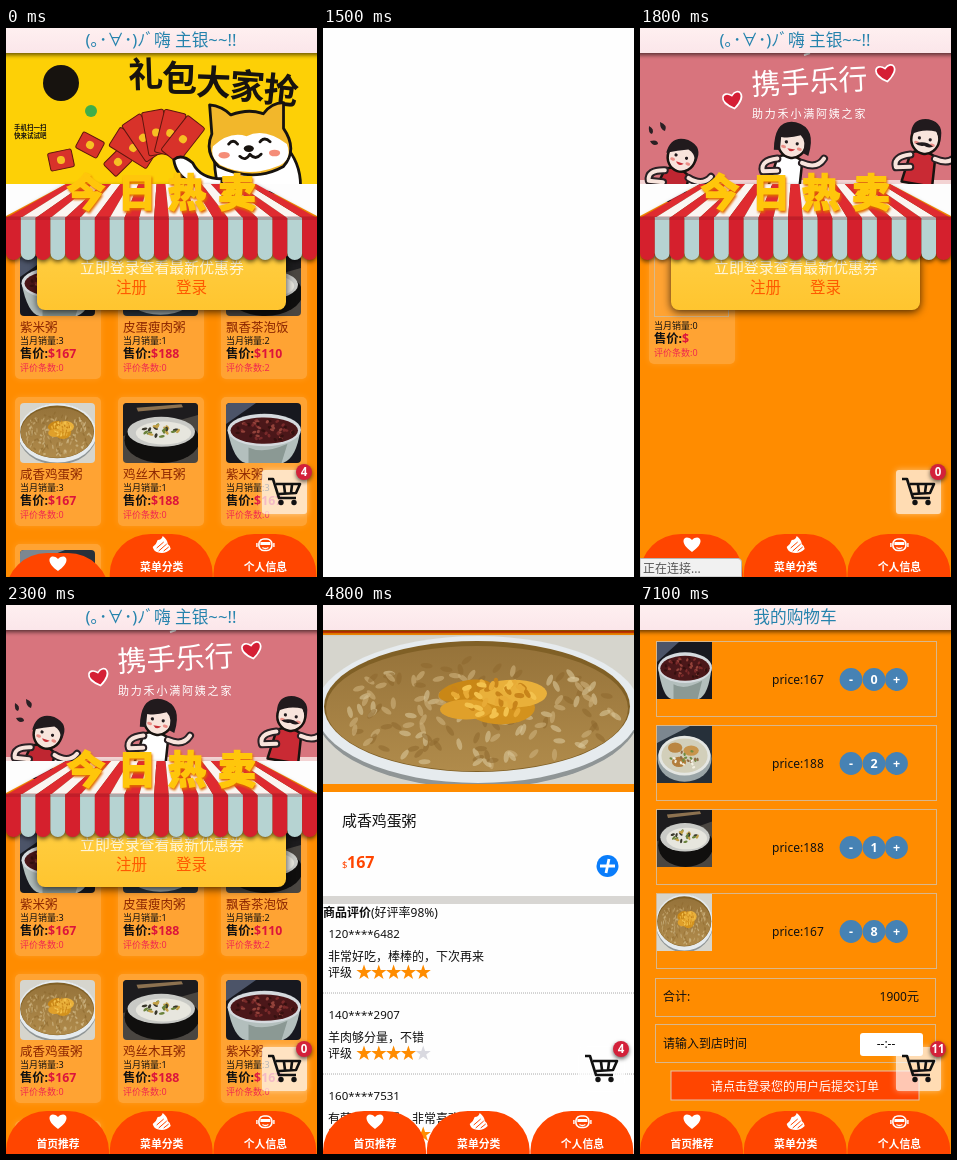
An HTML page that plays this animation: 311 px wide and 549 px high, repeating every 8 s.

```html
<!DOCTYPE html>
<html lang="zh-CN">
<head>
<meta charset="utf-8">
<style>
html, body { margin: 0; width: 311px; height: 549px; overflow: hidden; background: #fefefe; }
svg { display: block; font-family: "Noto Sans", "Noto Sans CJK SC", "Noto Sans CJK", sans-serif; }
.mid { text-anchor: middle; }
.b { font-weight: 700; }
.shade { filter: drop-shadow(0 2px 2px #0009); }
.glow { filter: drop-shadow(0 0 3px #fffa); }
.ink { stroke: #17130f; stroke-width: 2.5; stroke-linejoin: round; stroke-linecap: round; }
</style>
</head>
<body>
<svg id="stage" width="311" height="549" viewBox="0 0 311 549"></svg>
<script>
const rect = (x, y, w, h, fill, more = '') => `<rect x="${x}" y="${y}" width="${w}" height="${h}" fill="${fill}" ${more}/>`;
const oval = (x, y, rx, ry, fill, more = '') => `<ellipse cx="${x}" cy="${y}" rx="${rx}" ry="${ry}" fill="${fill}" ${more}/>`;
const disc = (x, y, r, fill, more) => oval(x, y, r, r, fill, more);
const path = (d, fill, more = '') => `<path d="${d}" fill="${fill}" ${more}/>`;
const text = (x, y, s, size, fill = '#111', more = '') => `<text x="${x}" y="${y}" font-size="${size}" fill="${fill}" ${more}>${s}</text>`;
const group = (body, more = '') => `<g ${more}>${body}</g>`;
const at = (x, y, body, more = '') => group(body, `transform="translate(${x} ${y}) ${more}"`);
const list = (n, fn) => Array.from({ length: n }, (_, i) => fn(i)).join('');
const MID = 'class="mid"', MIDB = 'class="mid b"', INK = 'class="ink"';
const ORANGE = '#ff8c00', RED = '#ff4500';

let seed = 7;
const rnd = () => (seed = seed * 16807 % 2147483647) / 2147483647;

// Random grains spread inside an ellipse
const grains = (n, x, y, rx, ry, w, h, colors) => list(n, i => {
  const a = rnd() * 6.283, r = Math.sqrt(rnd());
  const gx = x + rx * r * Math.cos(a), gy = y + ry * r * Math.sin(a);
  return oval(gx.toFixed(1), gy.toFixed(1), w, h, colors[i % colors.length],
    `transform="rotate(${Math.round(rnd() * 180)} ${gx.toFixed(1)} ${gy.toFixed(1)})"`);
});

// Dishes
const symbol = (id, w, h, body) => `<symbol id="${id}" viewBox="0 0 ${w} ${h}" preserveAspectRatio="none">${body}</symbol>`;
const dish = (id, x, y, w, h) => `<use href="#${id}" x="${x}" y="${y}" width="${w}" height="${h}"/>`;
const dishes =
  symbol('egg', 311, 150,
    rect(0, 0, 311, 150, '#d6d5cd') + oval(155, 78, 162, 76, '#8f9596') +
    oval(155, 75, 162, 74, '#e6ebee') + oval(154, 72, 153, 66, '#806026') + oval(154, 74, 151, 63, 'url(#broth)') +
    grains(150, 154, 78, 140, 54, 6, 2.6, ['#c9ad77aa', '#d9c79a99', '#8c682d88']) +
    oval(142, 56, 27, 10, '#c98716', 'transform="rotate(-12 142 56)"') +
    oval(178, 73, 34, 17, '#d3921d') + oval(190, 59, 34, 14, '#e9b03a') + oval(143, 75, 26, 10, '#e0a02a') +
    grains(40, 172, 64, 46, 18, 5, 2.5, ['#f3c24e', '#c8841a', '#e8ab36'])) +
  symbol('beans', 100, 100,
    rect(0, 0, 100, 100, '#17181f') + path('M0 0H40L0 35Z', '#4c5468') +
    path('M2 45Q10 96 26 100H76Q94 92 99 45Z', '#b3bfbd') + path('M30 74Q50 86 82 68L74 100H30Z', '#8b9994') +
    oval(51, 45, 49, 27, '#d5dade') + oval(51, 46, 45, 22, '#4b1719') +
    grains(45, 51, 46, 40, 18, 3, 2, ['#7a2a2a', '#93423a', '#35100f'])) +
  symbol('black', 100, 100,
    rect(0, 0, 100, 100, '#4a4641') + path('M0 55L100 20V0H0Z', '#1d1c1e') +
    oval(52, 62, 50, 38, '#100f0e') + oval(51, 48, 45, 25, '#c9cac6') + oval(54, 50, 37, 19, '#e7e6de') +
    path('M18 8L78 2L80 7L20 14Z', '#8d7250') + grains(20, 50, 46, 24, 10, 4, 2, ['#69813a', '#c2a047', '#39372b'])) +
  symbol('white', 100, 100,
    rect(0, 0, 100, 100, '#26303a') + path('M0 30L60 0H0Z', '#7c8790') +
    oval(50, 58, 49, 40, '#9aa5a7') + oval(50, 52, 47, 35, '#e4e6e2') + oval(50, 52, 42, 30, '#d2cfba') +
    oval(33, 38, 13, 9, '#ba8642') + oval(62, 43, 14, 9, '#c8954c') + oval(40, 63, 13, 9, '#b27d3b') +
    grains(20, 55, 58, 30, 16, 3, 2, ['#6f8b42', '#f2efe1', '#8f6a46']));

// Shared chrome
const header = s => rect(-4, -4, 319, 29, 'url(#blush)', 'class="shade"') + text(155, 18, s, 16.7, '#2583ad', MID);
const HEART = 'M0 7C-15 -3 -7 -12 0 -5C7 -12 15 -3 0 7Z';
const icons = [
  path(HEART, '#fff'),
  path('M-9 2Q-5 -1 -4 -5Q0 -5 1 -9Q6 -5 6 -1Q9 1 9 4Q3 10 -5 7Q-8 6 -9 2Z', '#fff') +
    path('M-5 3L2 -3M-3 6L5 -1M2 6L7 2', 'none', `stroke="${RED}"`),
  rect(-6.5, -6, 13, 11.5, 'none', 'rx="5" stroke="#fff" stroke-width="1.6"') + rect(-5, -3, 10, 3, '#fff') +
    path('M-3 2.5Q0 4.5 3 2.5M-8.5 -2V2M8.5 -2V2', 'none', 'stroke="#fff" stroke-width="1.4"')
];
const tabs = ['首页推荐', '菜单分类', '个人信息'].map((s, i) => at(i * 103.7, 0,
  path('M0 549V546A41 40 0 0 1 41 506H62A41 40 0 0 1 103 546V549Z', RED) +
  at(52, 517, icons[i]) + text(52, 543, s, 10.8, '#fff', MIDB)));
const nav = group(tabs[0], 'id="firstTab"') + tabs[1] + tabs[2];
const cart =
  rect(256, 442, 45, 44, '#fff', 'rx="3" opacity=".7" class="glow"') +
  path('M262 451H267L273 470H290M270 456H294L290 465L273 466M278 457L279 465M286 457L285 465', 'none',
    'stroke="#111" stroke-width="2.6" stroke-linejoin="round"') +
  disc(275, 474.5, 2.7, '#111') + disc(288, 474.5, 2.7, '#111') +
  disc(298, 444, 8, '#d3213a', 'class="shade"') + text(298, 448.3, '', 11.5, '#fff', 'id="badge" class="mid b"');

// Home banners
const packet = (x, y, a, w = 18, h = 24) => at(x, y,
  rect(-w / 2, -h / 2, w, h, '#d8322a', 'rx="2" stroke="#5f160e"') + disc(0, 0, 4, '#f7bf23'), `rotate(${a})`);
const fan = list(5, i => {
  const deg = -58 + i * 24, a = deg * Math.PI / 180;
  return packet(156 + 34 * Math.sin(a), 138 - 34 * Math.cos(a), deg, 22, 44);
});
const dog = group(
  path('M214 160Q205 128 214 118H272Q288 135 286 160Z', '#fff', INK) +
  path('M207 108L205 82Q216 83 224 91Q240 85 253 90Q260 80 271 80L271 103Q284 122 271 137Q244 152 213 137Q200 124 207 108Z', '#f2b72b', INK) +
  path('M208 119Q223 105 238 110Q254 102 274 117Q279 130 268 136Q240 148 215 136Q205 129 208 119Z', '#fff') +
  path('M222 117Q226 112 230 117M250 115Q254 110 259 115M232 128Q237 133 241 126Q246 132 251 126', 'none', INK) +
  oval(240, 121, 4.5, 3, '#17130f') + oval(218, 127, 5, 3, '#f58d78') + oval(263, 125, 5, 3, '#f58d78') +
  path('M216 148Q197 148 190 134Q180 125 173 131Q175 145 188 151Q201 160 216 160Z', '#fff', INK),
  'transform="translate(-26 -15) scale(1.12)"');
const giftBanner =
  rect(0, 0, 311, 156, '#fdd006') +
  disc(55, 55, 18, '#17130f') + disc(85, 83, 6, '#3fae49') +
  text(8, 102, '手机扫一扫', 6.5, '#17130f', 'class="b"') + text(8, 110, '快来试试吧', 6.5, '#17130f', 'class="b"') +
  [...'礼包大家抢'].map((c, i) => at(140 + i * 33.5, 59 + i * 4,
    text(0, 0, c, 35, '#17130f', 'class="mid" font-weight="900"'), `rotate(${i * 2 - 2})`)).join('') +
  packet(55, 132, 78) + packet(84, 117, -62) + packet(112, 134, 45) + fan + dog;

const drops = path('M9 98Q15 101 12 106Q8 105 9 98ZM20 94Q28 97 25 103Q20 102 20 94ZM10 113Q18 111 18 116Q13 119 10 113Z', '#2a2024');
const ARMS = 'M-12 22Q-29 27 -24 37L-10 34M13 22Q29 26 34 14';
const arms = (color, width) => path(ARMS, 'none', `stroke="${color}" stroke-width="${width}" stroke-linecap="round" stroke-linejoin="round"`);
const runner = (x, y, lean, hair, shirt, more) => at(x, y,
  path('M-12 20Q0 13 13 20L15 50H-16Z', shirt, INK) + arms('#2a2024', 8) + arms('#f8e4dc', 4) +
  oval(0, 4, 14, 15, '#f8e4dc', INK) + path(hair, '#211a1d') +
  disc(-6, 4, 1.6, '#211a1d') + disc(5, 4, 1.6, '#211a1d') + oval(-8, 9, 2.5, 1.6, '#ec8d86') + oval(8, 9, 2.5, 1.6, '#ec8d86') + more,
  `rotate(${lean})`);
const smile = path('M-4 10Q0 15 4 10Z', '#c72e35');
const redHeart = (x, y, a) => at(x, y, path(HEART, '#d51f35', 'stroke="#fff" stroke-width="1.5"'), `rotate(${a}) scale(1.1)`);
const runBanner =
  rect(0, 0, 311, 156, '#d8747d') + rect(0, 152, 311, 4, '#f3d3d3') +
  path('M156 24H178M164 27L170 25', 'none', 'stroke="#fff" stroke-width="2"') +
  at(112, 67, text(0, 0, '携手乐行', 29, '#fff'), 'rotate(-3)') +
  text(112, 90, '助力禾小满阿姨之家', 11, '#fff', 'letter-spacing="1.8"') +
  redHeart(93, 73, -12) + redHeart(246, 46, -10) + drops +
  runner(43, 125, 18, 'M-16 5Q-17 -14 1 -14Q18 -12 15 5Q11 -4 4 -5Q-6 -1 -16 5Z', '#bf2631', smile) +
  runner(153, 111, 10, 'M-17 14Q-22 -17 0 -17Q22 -15 18 14L12 12Q14 0 7 -5Q-3 0 -12 0L-11 13Z', '#fff', smile) +
  runner(286, 107, 10, 'M-15 2Q-17 -15 0 -16Q17 -15 15 4L10 -5Q-4 -6 -15 2Z', '#c92a34', path('M-9 10Q0 5 9 10Q5 13 0 11Q-5 13 -9 10Z', '#211a1d'));

// Awning with the sign and login box
const N = 21, W = 311 / N;
const awning = path('M0 156H60L0 188ZM311 156H250L311 188Z', '#fdfdfd') + group(
  list(N, i => {
    const x = i * W, top = 60 + i * 190 / N, odd = i % 2;
    return path(`M${top} 156H${top + 190 / N}L${x + W} 190H${x}Z`, odd ? '#fbf5f1' : '#df2b30') +
      path(`M${x} 189H${x + W}V225A${W / 2} 7 0 0 1 ${x} 225Z`, odd ? '#b6d3d2' : '#d5202d');
  }) + rect(0, 188, 311, 4, '#7a151d', 'opacity=".22"'), 'class="shade"') +
  `<text x="61 112 162 212" y="178" font-size="38" font-weight="900" fill="#ffc60b" stroke="#ffc60b" stroke-width="2" style="filter:drop-shadow(1px 2px 1px #e06a00)">今日热卖</text>`;
const login =
  rect(31, 190, 249, 92, 'url(#gold)', 'rx="8" style="filter:drop-shadow(0 2px 4px #000b)"') +
  text(74, 245, '立即登录查看最新优惠券', 14.9, '#fff5d8') +
  text(110, 265, '注册', 15.5, '#ff5a00') + text(170, 265, '登录', 15.5, '#ff5a00');

// Product cards: name, picture, monthly sales, price, reviews
const facts = (y, sales, price, reviews) =>
  text(5, y, '当月销量:' + sales, 9) +
  text(5, y + 14, `售价:<tspan fill="#dc143c">$${price}</tspan>`, 12.3, '#111', 'class="b"') +
  text(5, y + 27, '评价条数:' + reviews, 9, '#f0284f');
const panel = h => rect(0, 0, 86, h, '#fff', 'rx="5" opacity=".2" class="glow"');
const goods = [
  ['紫米粥', 'beans', 3, 167, 0], ['皮蛋瘦肉粥', 'white', 1, 188, 0], ['飘香茶泡饭', 'black', 2, 110, 2],
  ['咸香鸡蛋粥', 'egg', 3, 167, 0], ['鸡丝木耳粥', 'black', 1, 188, 0], ['紫米粥', 'beans', 3, 167, 0],
  ['皮蛋瘦肉粥', 'white', 1, 188, 0]
].map(([name, pic, ...rest], i) => at(9 + i % 3 * 103, 222 + Math.floor(i / 3) * 147,
  panel(129) + group(dish(pic, 5, 6, 75, 60), 'clip-path="url(#thumb)"') +
  text(5, 82, name, 12.5, '#8b2500', 'font-weight="500"') + facts(94, ...rest))).join('');
const emptyCard = at(9, 222, panel(114) + rect(5.5, 6.5, 74, 60, 'none', 'stroke="#d9b98a"') + facts(79, 0, '', 0));

const home =
  rect(0, 0, 311, 549, ORANGE) + group(goods, 'id="goods"') + group(emptyCard, 'id="emptyCard"') +
  login + group(giftBanner, 'id="gift"') + group(runBanner, 'id="run"') + awning + header('(｡･∀･)ﾉﾞ嗨 主银~~!!');

// Product page
const star = (x, y, fill) => path('M' + Array.from({ length: 10 }, (_, i) => {
  const r = i % 2 ? 3.2 : 8, a = i * Math.PI / 5;
  return `${(x + r * Math.sin(a)).toFixed(1)} ${(y - r * Math.cos(a)).toFixed(1)}`;
}).join('L') + 'Z', fill);
const review = (y, phone, words, stars) => at(0, y,
  text(5.5, 0, phone, 11.5) + text(5, 23, words, 12) + text(5, 39, '评级', 12) +
  list(5, i => star(41 + i * 14.8, 34.5, i < stars ? ORANGE : '#d9d9e0')) +
  path('M0 55H311', 'none', 'stroke="#aaa" stroke-dasharray="1 1"'));
const product =
  rect(0, 0, 311, 549, '#fefefe') + rect(0, 20, 311, 167, ORANGE) + rect(0, 26, 311, 2, RED) + dish('egg', 0, 30, 311, 149) +
  rect(0, 179, 311, 7, ORANGE) + text(19, 221, '咸香鸡蛋粥', 14.9, '#111', 'font-weight="500"') +
  text(19, 263, '$', 9.5, RED) + text(24, 263, '167', 16, RED, 'class="b"') +
  disc(284.5, 261, 11, '#0a7dfb') + path('M277 261H292M286 254L283 268', 'none', 'stroke="#fff" stroke-width="2.8"') +
  rect(0, 291, 311, 8, '#d8d6d3') +
  text(0, 312, '<tspan class="b">商品评价</tspan>(好评率98%)', 12) +
  review(333, '120****6482', '非常好吃，棒棒的，下次再来', 5) +
  review(414, '140****2907', '羊肉够分量，不错', 4) +
  review(495, '160****7531', '有营养又好喝，非常喜欢', 5) + header('');

// Cart page
const frame = (x, y, w, h) => rect(x + .5, y + .5, w, h, 'none', 'stroke="#d9b78c"');
const knob = (x, s) => disc(x, 38.5, 11.4, '#4682b4') + text(x, 43, s, 12.5, '#fff', MIDB);
const order = [['beans', 167, 0], ['white', 188, 2], ['black', 188, 1], ['egg', 167, 8]].map(([pic, price, count], i) =>
  at(0, 36 + i * 84, frame(16, 0, 280, 75) + dish(pic, 17, 1, 55, 57) + text(132, 43, 'price:' + price, 12) +
    knob(211, '-') + knob(234, count) + knob(256.5, '+'))).join('');
const basket =
  rect(0, 0, 311, 549, ORANGE) + order +
  frame(15, 373, 280, 38) + text(23, 396, '合计:', 12) + text(279, 396, '1900元', 12, '#111', 'text-anchor="end"') +
  frame(15, 419, 280, 38) + text(23, 443, '请输入到店时间', 12) +
  rect(220, 428, 63, 23, '#fff', 'rx="3"') + text(246, 443, '--:--', 12, '#111', MID) +
  rect(31, 466, 248, 29, RED, 'stroke="#e3bfa8"') + text(155, 486, '请点击登录您的用户后提交订单', 12, '#fff', 'class="mid" font-weight="500"') +
  header('我的购物车');

const status = path('M0 549V530.5H98Q101.5 530.5 101.5 534V549Z', '#f1f1f1', 'stroke="#b5b5b5"') + text(3, 545, '正在连接...', 12, '#555');

const gradient = (id, a, b) => `<linearGradient id="${id}" x2="0" y2="1"><stop stop-color="${a}"/><stop offset="1" stop-color="${b}"/></linearGradient>`;
const $ = id => document.getElementById(id);
$('stage').innerHTML =
  `<defs>${gradient('blush', '#fff1f1', '#fbe6ea')}${gradient('gold', '#ffd24a', '#ffc52f')}${gradient('broth', '#96733a', '#b08b4b')}
  <clipPath id="thumb">${rect(5, 6, 75, 60, '#000', 'rx="4"')}</clipPath>${dishes}</defs>` +
  group(group(home, 'id="home"') + group(product, 'id="product"') + group(basket, 'id="basket"') + nav + cart +
    group(status, 'id="status"'), 'id="page"');

const badgeSteps = [[0, 4], [1500, 0], [4800, 4], [4900, 5], [5100, 6], [5300, 8], [5600, 9], [5800, 10], [5900, 11]];
const show = (id, on) => $(id).style.display = on ? '' : 'none';

function draw() {
  const t = performance.now() % 8000;
  show('page', t < 1500 || t >= 1800);
  show('home', t < 3600);
  show('product', t >= 3600 && t < 7100);
  show('basket', t >= 7100);
  show('gift', t < 1500);
  show('run', t >= 1500);
  show('goods', t < 1500 || t >= 1900);
  show('emptyCard', t >= 1500 && t < 1900);
  show('status', t >= 1800 && t < 2300);
  $('status').setAttribute('opacity', t < 2200 ? 1 : .5);
  $('firstTab').setAttribute('transform', `translate(0 ${t < 1100 ? 19 : 0})`);
  $('badge').textContent = badgeSteps.filter(([from]) => from <= t).pop()[1];
  requestAnimationFrame(draw);
}
draw();
</script>
</body>
</html>
```
